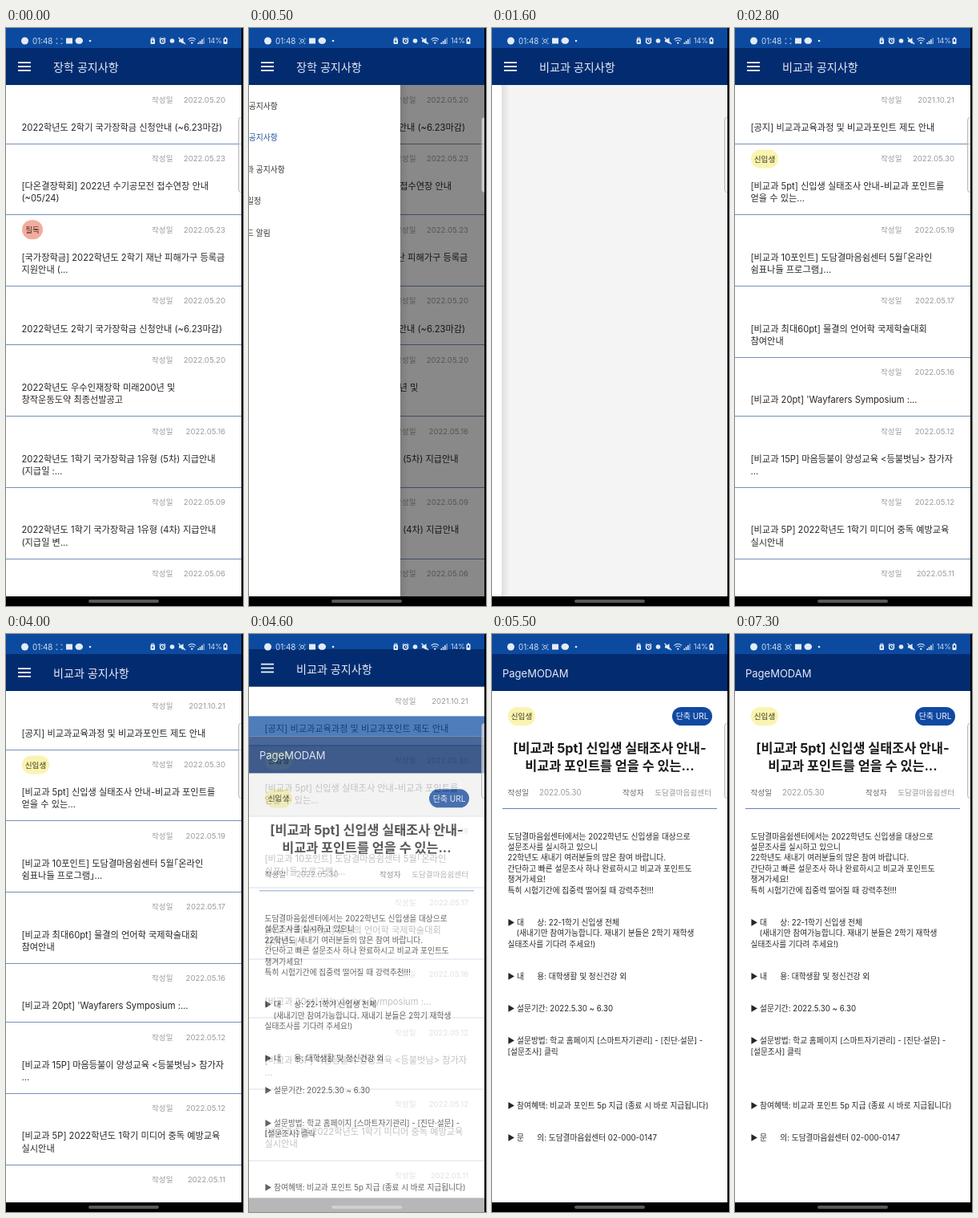
Recreate the animation shown at these times as an HTML page. Size 296 by 720 pixels, loop 7.7 s.

```html
<!DOCTYPE html>
<html lang="ko">
<head>
<meta charset="utf-8">
<title>공지사항</title>
<style>
html, body { margin: 0; width: 100%; height: 100%; overflow: hidden; background: #000; }
svg { display: block; width: 100vw; height: 100vh; }
text { font-family: Inter, 'Noto Sans CJK KR', 'Noto Sans KR', 'Noto Sans CJK SC', sans-serif; white-space: pre; }
</style>
</head>
<body>
<svg id="stage" viewBox="0 0 296 720" xmlns="http://www.w3.org/2000/svg"></svg>
<script>
const LOOP = 7700, STEP = 100, DRAWER = 228;
const NAVY = '#032c70', BLUE = '#0b4a9f', INK = '#262626', GREY = '#9b9b9b', RULE = '#7590b8';

const esc = s => s.replace(/&/g, '&amp;').replace(/</g, '&lt;');
const rect = (x, y, w, h, fill, more = '') =>
  `<rect x="${x}" y="${y}" width="${w}" height="${h}" fill="${fill}" ${more}/>`;
// cy is the optical middle of the line
const text = (x, cy, size, fill, s, more = '') =>
  `<text x="${x}" y="${(cy + size * 0.37).toFixed(2)}" font-size="${size}" fill="${fill}" ${more}>${esc(s)}</text>`;
const group = (id, inner, more = '') => `<g id="${id}" ${more}>${inner}</g>`;
const pill = (x, y, w, h, fill, size, ink, s) =>
  rect(x, y, w, h, fill, `rx="${Math.min(w, h) / 2}"`) +
  text(x + w / 2, y + h / 2, size, ink, s, 'text-anchor="middle"');

const scholarships = [
  ['2022.05.20', ['2022학년도 2학기 국가장학금 신청안내 (~6.23마감)']],
  ['2022.05.23', ['[다온결장학회] 2022년 수기공모전 접수연장 안내', '(~05/24)']],
  ['2022.05.23', ['[국가장학금] 2022학년도 2학기 재난 피해가구 등록금', '지원안내 (...'], '필독'],
  ['2022.05.20', ['2022학년도 2학기 국가장학금 신청안내 (~6.23마감)']],
  ['2022.05.20', ['2022학년도 우수인재장학 미래200년 및', '창작운동도약 최종선발공고']],
  ['2022.05.16', ['2022학년도 1학기 국가장학금 1유형 (5차) 지급안내', '(지급일 :...']],
  ['2022.05.09', ['2022학년도 1학기 국가장학금 1유형 (4차) 지급안내', '(지급일 변...']],
  ['2022.05.06', []]
];

const activities = [
  ['2021.10.21', ['[공지] 비교과교육과정 및 비교과포인트 제도 안내']],
  ['2022.05.30', ['[비교과 5pt] 신입생 실태조사 안내-비교과 포인트를', '얻을 수 있는...'], '신입생'],
  ['2022.05.19', ['[비교과 10포인트] 도담결마음쉼센터 5월｢온라인', '쉼표나들 프로그램｣...']],
  ['2022.05.17', ['[비교과 최대60pt] 물결의 언어학 국제학술대회', '참여안내']],
  ['2022.05.16', ["[비교과 20pt] 'Wayfarers Symposium :..."]],
  ['2022.05.12', ['[비교과 15P] 마음등불이 양성교육 <등불벗님> 참가자', '...']],
  ['2022.05.12', ['[비교과 5P] 2022학년도 1학기 미디어 중독 예방교육', '실시안내']],
  ['2022.05.11', []]
];

function list(rows) {
  let y = 71, out = '';
  for (const [date, lines, tag] of rows) {
    out += text(274, y + 18, 9.6, GREY, date, 'text-anchor="end"');
    out += text(208.5, y + 18, 9.6, GREY, '작성일', 'text-anchor="end"');
    if (tag === '필독') out += pill(20, y + 6, 26, 24, '#f2ac9e', 9.6, '#4a2a24', tag);
    else if (tag) out += pill(20, y + 7, 34, 23, '#fbf4b0', 9.6, '#3a3820', tag);
    lines.forEach((s, i) => out += text(19.5, y + 52.5 + i * 15.2, 11.2, INK, s));
    y += lines.length === 1 ? 73.5 : 88.7;
    if (lines.length) out += rect(0, Math.round(y) - 1, 294, 1, RULE);
  }
  return out;
}

const menu = ['학사 공지사항', '장학 공지사항', '비교과 공지사항', '학사일정', '키워드 알림'];

const paper = rect(0, 71, 294, 637, '#fff');
const drawer = rect(0, 71, DRAWER, 637, '#fff') +
  rect(DRAWER, 71, 10, 637, 'url(#shade)') +
  menu.map((s, i) => text(18, 97 + i * 39.5, 9.8, '#333', s, 'class="item"')).join('');

const handle = rect(103, 712, 88, 4, '#585858', 'rx="2"');
const navBar = rect(0, 708, 296, 12, '#000') + handle;
const bars = rect(0, 0, 294, 25, BLUE) + rect(0, 25, 294, 46, NAVY);

const gap = '\u00a0'.repeat(6);
const body = [
  [0, '도담결마음쉼센터에서는 2022학년도 신입생을 대상으로'],
  [1, '설문조사를 실시하고 있으니'],
  [2, '22학년도 새내기 여러분들의 많은 참여 바랍니다.'],
  [3, '간단하고 빠른 설문조사 하나 완료하시고 비교과 포인트도'],
  [4, '챙겨가세요!'],
  [5, '특히 시험기간에 집중력 떨어질 때 강력추천!!!'],
  [8, `▶ 대${gap}상: 22-1학기 신입생 전체`],
  [9, '\u00a0\u00a0\u00a0\u00a0(새내기만 참여가능합니다. 재내기 분들은 2학기 재학생'],
  [10, '실태조사를 기다려 주세요!)'],
  [13, `▶ 내${gap}용: 대학생활 및 정신건강 외`],
  [16, '▶ 설문기간: 2022.5.30 ~ 6.30'],
  [19, '▶ 설문방법: 학교 홈페이지 [스마트자기관리] - [진단·설문] -'],
  [20, '[설문조사] 클릭'],
  [25, '▶ 참여혜택: 비교과 포인트 5p 지급 (종료 시 바로 지급됩니다)'],
  [28, `▶ 문${gap}의: 도담결마음쉼센터 02-000-0147`]
];

const heading = 'text-anchor="middle" font-weight="700"';
const detail = paper + bars +
  text(13, 49, 13, '#e6ebf5', 'PageMODAM') +
  pill(20, 91, 34, 23, '#fbf4b0', 9.6, '#3a3820', '신입생') +
  pill(225, 91, 50, 23, '#1049a2', 10, '#f2f5fb', '단축 URL') +
  text(147, 142, 16.3, '#1a1a1a', '[비교과 5pt] 신입생 실태조사 안내-', heading) +
  text(147, 163.5, 16.3, '#1a1a1a', '비교과 포인트를 얻을 수 있는...', heading) +
  text(19.5, 197, 9.6, '#666', '작성일') +
  text(59, 197, 9.7, GREY, '2022.05.30') +
  text(163, 197, 9.6, '#666', '작성자') +
  text(274, 197, 9.65, GREY, '도담결마음쉼센터', 'text-anchor="end"') +
  rect(13, 217, 268, 1, '#5f84b8') +
  body.map(([n, s]) => text(19.5, 252 + n * 13.4, 9.7, INK, s)).join('') +
  navBar + rect(294, 0, 2, 720, '#000');

const W = '#e4ebf6';
const line = (d, w = 1) => `<path d="${d}" fill="none" stroke="${W}" stroke-width="${w}"/>`;
const status =
  `<circle cx="23.5" cy="16" r="4.5" fill="${W}"/>` +
  text(33, 16, 9.8, '#d5dff0', '01:48') +
  `<g opacity=".7">${line('M63 14.5v-1.5h1.5M63 18v1.5h1.5M70 14.5v-1.5h-1.5M70 18v1.5h-1.5', 0.9)}</g>` +
  group('rec', `<circle cx="66.5" cy="16.2" r="1.9" fill="none" stroke="${W}" stroke-width="1"/>`) +
  rect(75, 12.5, 8, 7, W) +
  `<ellipse cx="91.3" cy="15.8" rx="4.8" ry="4" fill="${W}"/>` +
  `<circle cx="105" cy="16" r="1.3" fill="${W}"/>` +
  rect(180.5, 13.5, 5.5, 6.5, W, 'rx="1"') + line('M181.8 14v-1.8h3v1.8') + rect(182.5, 15.5, 1.5, 2.5, BLUE) +
  `<circle cx="195.5" cy="16.3" r="3" fill="none" stroke="${W}" stroke-width="1.5"/>` +
  line('M191.5 13.5l2-1.7M199.5 13.5l-2-1.7M195.5 14.7v1.8h1.3') +
  `<circle cx="207.5" cy="16" r="2.8" fill="${W}"/>` +
  `<path d="M216 14.5h2l3.5-2.5v8l-3.5-2.5h-2z" fill="${W}"/>` + line('M215.5 11.8l8.5 8.2', 1.2) +
  line('M227.5 14.3q4.7-4 9.4 0M229 16.4q3.2-2.7 6.4 0', 1.1) +
  `<circle cx="232.2" cy="18.6" r="1.2" fill="${W}"/>` +
  [0, 1, 2, 3].map(i => rect(239.5 + i * 2.3, 18 - i * 2, 1.5, 2 + i * 2, W, i > 2 ? 'opacity=".5"' : '')).join('') +
  text(252, 16, 8.7, '#d5dff0', '14%') +
  rect(271.5, 12.5, 5, 7.5, W, 'rx="1"') + rect(273, 11.5, 2, 1.5, W) + rect(273, 14, 2, 3, BLUE);

const stage = document.getElementById('stage');
stage.innerHTML =
  `<defs>
    <linearGradient id="shade"><stop offset="0" stop-opacity=".09"/><stop offset="1" stop-opacity="0"/></linearGradient>
    <clipPath id="screen"><rect width="294" height="720"/></clipPath>
  </defs>` +
  rect(0, 0, 296, 720, '#000') +
  group('main',
    rect(0, 71, 294, 637, '#f4f4f4') +
    group('listA', paper + list(scholarships)) +
    group('listB', paper + rect(0, 144, 294, 88, '#d6d6d6', 'id="press"') + list(activities)) +
    rect(0, 71, 294, 637, '#000', 'id="dim"') +
    group('drawer', drawer) +
    bars +
    [42.2, 47.1, 52].map(y => rect(15, y, 16, 1.8, '#eef2f9')).join('') +
    text(59, 49, 14.1, '#e6ebf5', '', 'id="title"') +
    rect(0, 708, 296, 12, '#000'), 'clip-path="url(#screen)"') +
  handle +
  group('detail', detail) +
  group('status', status) +
  rect(290.5, 111.5, 12, 93, '#f6f6f6', 'rx="3" fill-opacity=".6" stroke="#a5a5a5" stroke-opacity=".75" clip-path="url(#screen)"') +
  rect(294, 0, 2, 720, '#000');

const $ = id => document.getElementById(id);
const items = [...document.querySelectorAll('.item')];
const show = (id, on) => $(id).setAttribute('display', on ? 'inline' : 'none');
const move = (id, x, y) => $(id).setAttribute('transform', `translate(${x.toFixed(2)} ${y.toFixed(2)})`);
const clamp = v => Math.max(0, Math.min(1, v));
// what is left of a decelerating move
const rest = (t, start, span, power) => Math.pow(1 - clamp((t - start) / span), power);

function draw(t) {
  const switched = t >= 1400;
  const open = switched ? rest(t, 1380, 352, 3) : 1 - rest(t, 300, 450, 3);
  show('listA', !switched);
  show('listB', t >= 1800);
  show('press', t >= 4500);
  $('title').textContent = menu[switched ? 2 : 1];
  items.forEach((el, i) => el.setAttribute('fill', i === (switched ? 2 : 1) ? '#23509a' : '#333'));

  show('drawer', open > 0.001);
  move('drawer', DRAWER * (open - 1), 0);
  $('dim').setAttribute('opacity', switched ? 0 : (0.56 * open).toFixed(3));

  // the new page rises and fades in while the old one drifts up
  const alpha = clamp((t - 4480) / 167);
  const left = rest(t, 4480, 620, 4);
  show('main', alpha < 1);
  show('detail', alpha > 0);
  $('detail').setAttribute('opacity', alpha.toFixed(3));
  move('detail', 0, 242 * left);
  move('main', 0, 9.5 * (left - 1));
  // the list stays visible above the rising page
  if (alpha === 1 && left > 0) show('main', true);

  show('rec', t >= 300 && Math.floor((t - 300) / 500) % 2 === 0);
}

const start = performance.now();
function tick() {
  const t = (performance.now() - start) % LOOP;
  draw(Math.floor(t / STEP) * STEP);
  requestAnimationFrame(tick);
}
tick();
</script>
</body>
</html>
```
